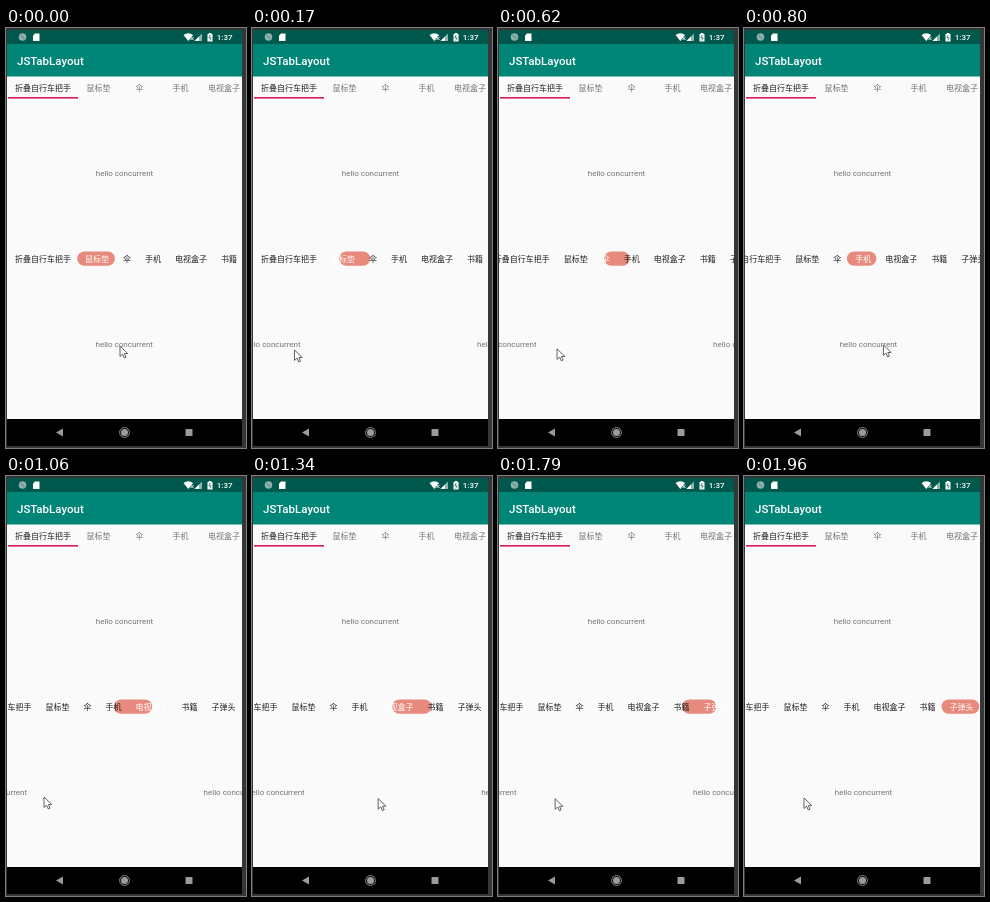
Write an HTML page that moves like this. It is 240 by 420 pixels and loops after 2050 ms.

```html
<!DOCTYPE html>
<html lang="zh-CN">
<head>
<meta charset="utf-8">
<title>JSTabLayout</title>
<style>
  html, body { margin: 0; width: 100%; height: 100%; overflow: hidden; background: #343637; }
  svg { display: block; width: 240px; height: 420px; }
  text { font: 8px Roboto, "Noto Sans CJK SC", "Noto Sans CJK", sans-serif; }
  .hello { fill: #757575; text-anchor: middle; }
</style>
</head>
<body>
<svg viewBox="0 0 240 420">
  <clipPath id="screen"><path d="M1 2H236V418H1Z"/></clipPath>
  <g clip-path="url(#screen)">
    <rect width="240" height="420" fill="#fafafa"/>
    <rect width="240" height="16" fill="#00574b"/>
    <rect y="16" width="240" height="32.500" fill="#008577"/>
    <rect y="391" width="240" height="29"/>

    <!-- status bar -->
    <circle cx="16.500" cy="9" r="3.800" fill="#8fb0ab"/>
    <path d="M14.500 7l4 4" stroke="#4d827b"/>
    <path d="M29 5.500h4.500v7.500h-6.500v-5.500z" fill="#fff"/>
    <path d="M177.500 7q4.800-3.500 9.600 0l-4.800 6z" fill="#fff"/>
    <path d="M184.500 9l3 3m0-3l-3 3" stroke="#fff" stroke-width=".9"/>
    <path d="M188.500 13h7.500v-7.500z" fill="#8fb5af"/>
    <path d="M188.500 13h4.500v-4.500z" fill="#fff"/>
    <path d="M201.500 6h1.200v-1h2.600v1h1.200v7.500h-5z" fill="#fff"/>
    <path d="M204.300 7l-1.500 2.800h2.400l-1.500 2.700" fill="none" stroke="#00574b" stroke-width=".7"/>
    <text x="210.800" y="12" fill="#fff" style="font-weight:500">1:37</text>

    <text x="11" y="36.500" fill="#fff" style="font-size:11.500px;font-weight:500">JSTabLayout</text>

    <g id="topTabs"></g>
    <rect x="2" y="69" width="70" height="1.600" fill="#d81b60"/>
    <text class="hello" x="118.500" y="148">hello concurrent</text>

    <g id="strip">
      <rect id="pill" y="223.500" height="14.300" rx="7.150" fill="#e78a7d"/>
    </g>
    <g id="pages"></g>

    <!-- navigation bar -->
    <g fill="#9b9b9b">
      <path d="M50 404.500l7-4v8z"/>
      <circle cx="118.500" cy="404.500" r="3.500"/>
      <circle cx="118.500" cy="404.500" r="4.900" fill="none" stroke="#9b9b9b" stroke-width=".9"/>
      <rect x="179.500" y="401" width="7" height="7"/>
    </g>

    <path id="cursor" d="M0 0V10.500L2.600 8.200L4.300 12L6 11.200L4.400 7.600H7.800Z" fill="#fff" stroke="#505050" stroke-width=".9"/>
  </g>
</svg>
<script>
const LOOP = 2050, STEP = 90, LEAD = 22;      // the screen refreshes once per STEP
const PAGE = 234, CHAR = 8, PAD = 7, SCROLL_RATE = 28.5, MAX_SCROLL = 39.5;
const DARK = "#212121", GREY = "#757575", WHITE = "#fff";
const names = ["折叠自行车把手", "鼠标垫", "伞", "手机", "电视盒子", "书籍", "子弹头"];

// each swipe moves the pager on by one page
const SWIPE = 420, swipeStarts = [-8, 430, 859, 1167, 1576];

// turning points of the pointer: time, x, y
const turns = [
  [0, 114, 318], [170, 42, 322], [450, 165, 316], [650, 56, 321], [870, 158, 316], [1080, 38, 321],
  [1290, 150, 320], [1480, 49, 331], [1620, 145, 321], [1850, 45, 323], [1980, 60, 322]
];

const $ = id => document.getElementById(id);
const lerp = (a, b, k) => a + (b - a) * k;
const clamp = (v, lo, hi) => Math.min(hi, Math.max(lo, v));
const smooth = v => { const k = clamp(v, 0, 1); return k * k * (3 - 2 * k); };

function addText(parent, text, x, y) {
  const el = document.createElementNS("http://www.w3.org/2000/svg", "text");
  el.textContent = text;
  el.setAttribute("x", x);
  el.setAttribute("y", y);
  return parent.appendChild(el);
}

function addTabs(parent, y, minWidth) {
  let right = 2;
  return names.map(name => {
    const left = right, textWidth = name.length * CHAR;
    const width = Math.max(minWidth, textWidth + 2 * PAD);
    right += width;
    return { left, right, label: addText(parent, name, left + (width - textWidth) / 2, y) };
  });
}

const select = (tabs, index, on, off) =>
  tabs.forEach((tab, i) => tab.label.setAttribute("fill", i === index ? on : off));

select(addTabs($("topTabs"), 63, 41), 0, DARK, GREY);
const tabs = addTabs($("strip"), 234, 0);
names.forEach((_, i) =>
  addText($("pages"), "hello concurrent", 118.5 + i * PAGE, 319.3).setAttribute("class", "hello"));

const pagerAt = t => swipeStarts.reduce((sum, start) => sum + smooth((t - start) / SWIPE), 1);

function pointerAt(t) {
  const next = turns.findIndex(turn => turn[0] > t);
  if (next < 0) return turns.at(-1).slice(1);
  const [t0, x0, y0] = turns[next - 1], [t1, x1, y1] = turns[next];
  const k = smooth((t - t0) / (t1 - t0));
  return [lerp(x0, x1, k), lerp(y0, y1, k)];
}

const move = (id, x, y) => $(id).setAttribute("transform", `translate(${x} ${y})`);

function draw() {
  const now = performance.now() % LOOP;
  const t = Math.floor((now + LEAD) / STEP) * STEP;
  const pos = pagerAt(t), i = Math.floor(pos);
  const from = tabs[i], to = tabs[Math.min(i + 1, tabs.length - 1)];
  const left = lerp(from.left, to.left, pos - i), right = lerp(from.right, to.right, pos - i);

  $("pill").setAttribute("x", left - 0.8);
  $("pill").setAttribute("width", right - left - 0.3);
  select(tabs, Math.round(pos), WHITE, DARK);
  move("strip", -clamp(SCROLL_RATE * (pos - 2), 0, MAX_SCROLL), 0);
  move("pages", -pos * PAGE, 0);
  move("cursor", ...pointerAt(t));
  requestAnimationFrame(draw);
}
draw();
</script>
</body>
</html>
```
